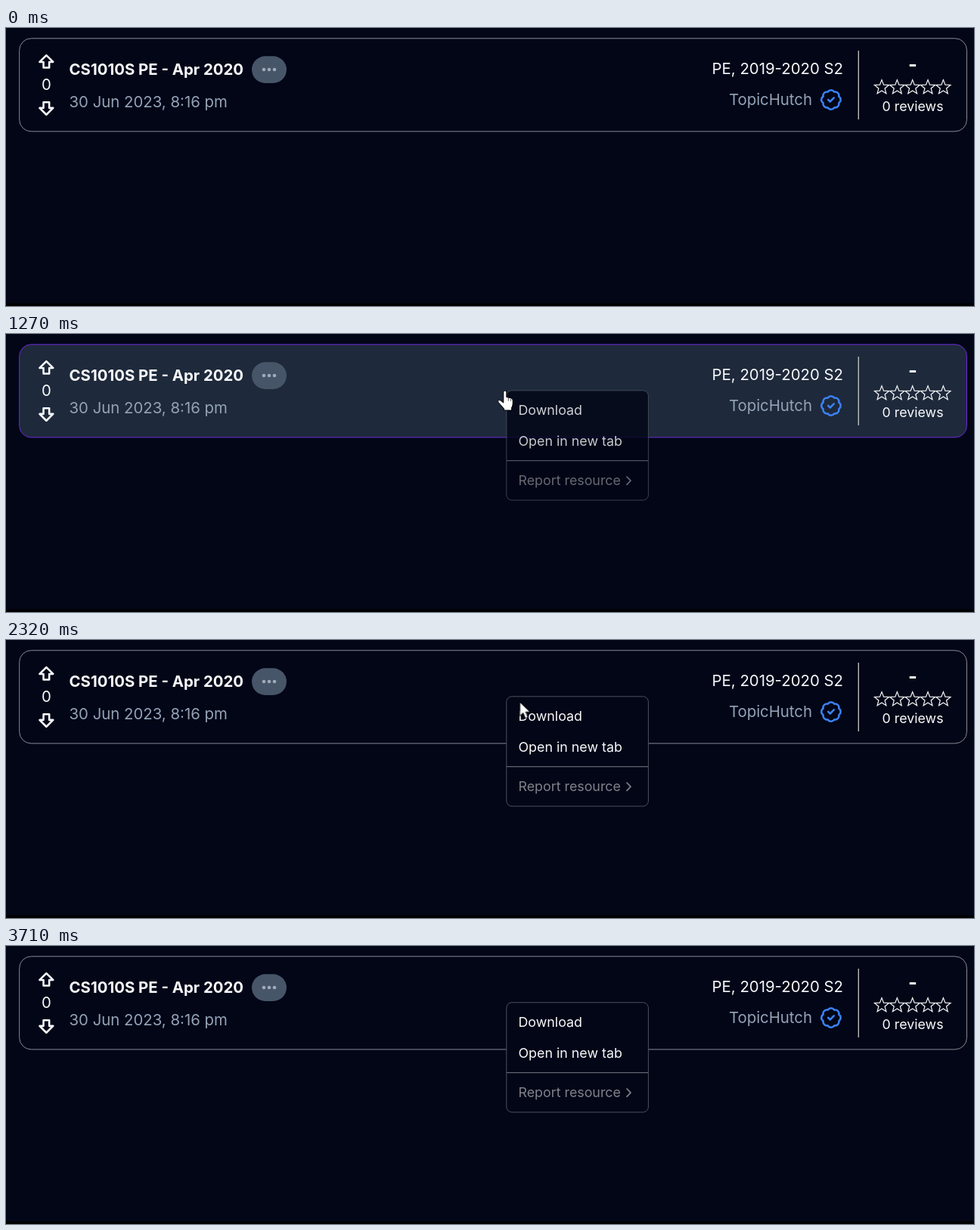
These frames come from a looping animation (1280x368 px, 4.11 s). An HTML page:

```html
<!DOCTYPE html>
<html lang="en">
<head>
<meta charset="utf-8">
<title>Resource card context menu</title>
<style>
  html, body { margin: 0; width: 100%; height: 100%; overflow: hidden; background: #020617; }
  svg { display: block; width: 100%; height: 100%; }
  text { font: 400 20.36px Inter, sans-serif; font-optical-sizing: none; fill: #f8fafc; }
  .small { font-size: 17.82px; }
  .title { font-weight: 700; }
  .score { font-size: 25.45px; font-weight: 700; }
  .muted { fill: #94a3b8; }
  .disabled { fill: #80828b; }
  .middle { text-anchor: middle; }
  .end { text-anchor: end; }
  .icon { fill: none; stroke: #f8fafc; stroke-width: 2; stroke-linecap: round; stroke-linejoin: round; }
  .verified { stroke: #3b82f6; }
  .star { fill: none; stroke: #f8fafc; stroke-width: 1.2; }

  .card, .menu, .cursor, .arrow, .hand, .item { animation: 4110ms linear infinite; }
  .card { fill: #020617; stroke: #868a94; animation-name: hover; }
  .menu { animation-name: open; }
  .menu-box { fill: #020617; stroke: #4b515d; }
  .item { fill: #1e293b; animation-timing-function: step-end; }
  .download { animation-name: download; }
  .new-tab { animation-name: new-tab; }
  .cursor { fill: #fff; stroke: #000; stroke-linejoin: round; animation-name: travel; }
  .arrow, .hand { animation-timing-function: step-end; }
  .arrow { animation-name: arrow; }
  .hand { animation-name: hand; }

  @keyframes hover {
    0%, 19.83% { fill: #020617; stroke: #868a94; animation-timing-function: cubic-bezier(.4, 0, .2, 1); }
    27.13% { fill: #1e293b; stroke: #6d28d9; }
    34.18% { fill: #1e293b; stroke: #6d28d9; animation-timing-function: cubic-bezier(.4, 0, .2, 1); }
    41.12%, 100% { fill: #020617; stroke: #868a94; }
  }
  @keyframes open {
    0% { opacity: 0; animation-timing-function: step-end; }
    30.9% { opacity: .8; }
    33%, 100% { opacity: 1; }
  }
  @keyframes download {
    0% { opacity: 0; }
    57.18% { opacity: 1; }
    67.27%, 100% { opacity: 0; }
  }
  @keyframes new-tab {
    0% { opacity: 0; }
    67.27% { opacity: 1; }
    84.8%, 100% { opacity: 0; }
  }
  @keyframes arrow {
    0% { opacity: 1; }
    19.83% { opacity: 0; }
    34.18%, 100% { opacity: 1; }
  }
  @keyframes hand {
    0% { opacity: 0; }
    19.83% { opacity: 1; }
    34.18%, 100% { opacity: 0; }
  }
  @keyframes travel {
    0%, 11.2% { transform: translate(716px, 372px); }
    15.5% { transform: translate(705px, 255px); }
    19.83% { transform: translate(690px, 137px); }
    21.65% { transform: translate(682px, 101px); }
    24.33%, 55.72% { transform: translate(660px, 76px); }
    56.45% { transform: translate(679px, 82px); }
    59.12%, 64.96% { transform: translate(735px, 97px); }
    66.42% { transform: translate(749px, 109px); }
    69.1%, 76.64% { transform: translate(792px, 150px); }
    81.75%, 84.18% { transform: translate(795px, 153px); }
    84.91% { transform: translate(799px, 167px); }
    89.54% { transform: translate(848px, 364px); }
    90.27%, 100% { transform: translate(853px, 392px); }
  }
</style>
</head>
<body>
<svg viewBox="0 0 1280 368">
  <rect width="1280" height="368" fill="#020617"/>
  <rect y="364.4" width="1280" height="4" fill="#000"/>

  <rect class="card" x="17.7" y="13.8" width="1252.8" height="123.1" rx="15.5"/>

  <path class="icon" transform="translate(38.1 29.7) scale(1.272)" d="M9 18v-6H5l7-7 7 7h-4v6H9z"/>
  <text class="middle" x="53.4" y="82">0</text>
  <path class="icon" transform="translate(38.1 90.6) scale(1.272)" d="M15 6v6h4l-7 7-7-7h4V6h6z"/>

  <text class="title" x="83.5" y="62">CS1010S PE - Apr 2020</text>
  <rect x="325" y="37.3" width="46" height="35.6" rx="17.8" fill="#475569"/>
  <g fill="#a0abb9">
    <circle cx="341" cy="55" r="2.3"/><circle cx="348" cy="55" r="2.3"/><circle cx="355" cy="55" r="2.3"/>
  </g>
  <text class="muted" x="83.5" y="105">30 Jun 2023, 8:16 pm</text>

  <text class="end" x="1107" y="61">PE, 2019-2020 S2</text>
  <text class="end muted" x="1066" y="102">TopicHutch</text>
  <g class="icon verified" transform="translate(1075.7 79.7) scale(1.272)">
    <path d="M3.85 8.62a4 4 0 0 1 4.78-4.77 4 4 0 0 1 6.74 0 4 4 0 0 1 4.78 4.78 4 4 0 0 1 0 6.74 4 4 0 0 1-4.77 4.78 4 4 0 0 1-6.75 0 4 4 0 0 1-4.78-4.77 4 4 0 0 1 0-6.76Z"/>
    <path d="m9 12 2 2 4-4"/>
  </g>

  <path d="M1127.3 30V121" stroke="#c8c8c4" stroke-width="1.3"/>
  <text class="middle score" x="1199" y="57">-</text>
  <g id="stars"></g>
  <text class="middle small" x="1199" y="110">0 reviews</text>

  <g class="menu">
    <rect class="menu-box" x="661.8" y="74.8" width="187.6" height="145.2" rx="7"/>
    <rect class="item download" x="667.5" y="80.5" width="176" height="41" rx="5"/>
    <rect class="item new-tab" x="667.5" y="121.5" width="176" height="40.5" rx="5"/>
    <path d="M662 167.7H849" stroke="#62666f" stroke-width="1.3"/>
    <text class="small" x="677.5" y="107">Download</text>
    <text class="small" x="677.5" y="147.8">Open in new tab</text>
    <text class="small disabled" x="677.5" y="200.3">Report resource</text>
    <path d="M821 189l5 5.2-5 5.2" fill="none" stroke="#80828b" stroke-width="1.7" stroke-linecap="round" stroke-linejoin="round"/>
  </g>

  <g class="cursor">
    <path class="arrow" d="M0 0V18.5L4.3 14.4 7.3 21.6 10.6 20.2 7.6 13.2H13.5Z"/>
    <g class="hand">
      <path d="M-2.2 1a2 2 0 0 1 4 0V7.5l6 1.4q2.4.7 2.4 3V16q0 3-1.6 5.5V25H-1.5V23L-8.8 14.5q-1.4-2 .4-2.8 1.4-.6 3 .8l3.2 2.6z"/>
      <path d="M4.3 9v3.6M7.3 9.8v3" stroke-width=".7"/>
    </g>
  </g>
</svg>
<script>
  const starPoints = (cx, cy, outer, inner) =>
    Array.from({ length: 10 }, (_, i) => {
      const radius = i % 2 ? inner : outer;
      const angle = i * Math.PI / 5;
      return `${cx + radius * Math.sin(angle)},${cy - radius * Math.cos(angle)}`;
    }).join(' ');

  document.getElementById('stars').innerHTML = Array.from({ length: 5 }, (_, i) =>
    `<polygon class="star" points="${starPoints(1158 + i * 20.35, 78.6, 10, 4.3)}"/>`).join('');
</script>
</body>
</html>
```
